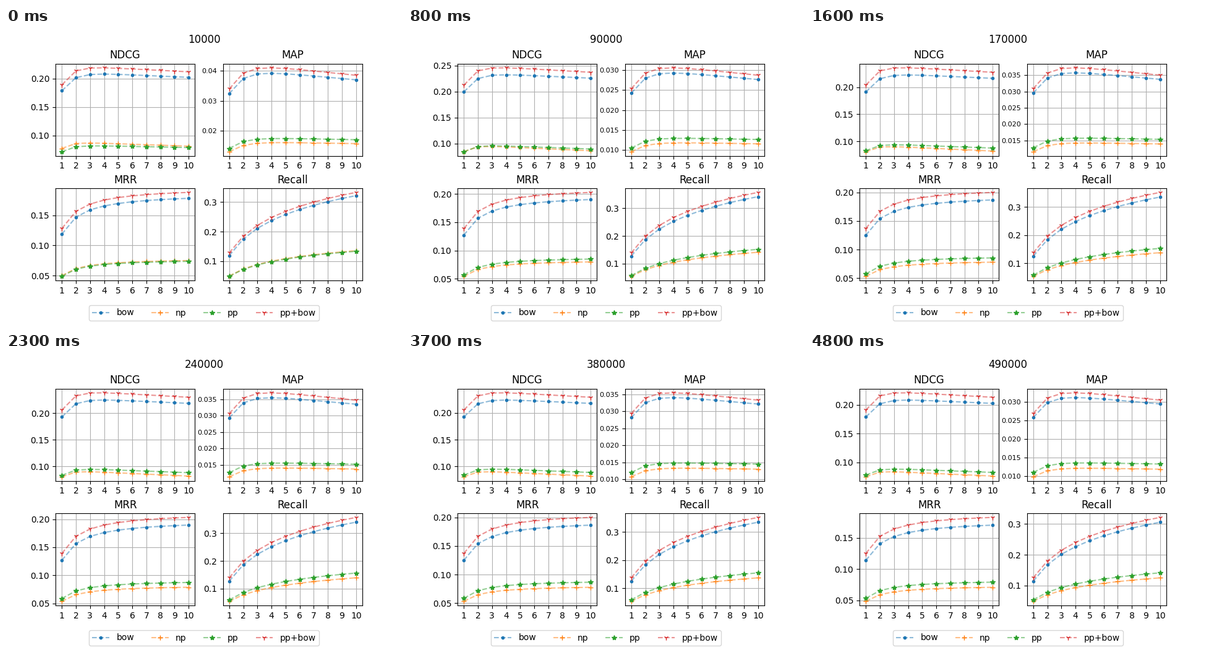
Animation, 640 px wide and 480 px high, one loop 6.3 s. Source, as a matplotlib script:

```python
import numpy as np
import matplotlib.pyplot as plt
from matplotlib.animation import FuncAnimation

STEPS, HOLD = 49, 14
NAMES = ["bow", "np", "pp", "pp+bow"]
MARKERS = [".", "+", "*", "1"]
RANKS = np.arange(1, 11)

# Turning points of the run and the level of pp+bow at each
TURNS = [0, 8, 16, 23, 32, 37, 48]
NDCG_TREND = [.2187, .2454, .2361, .2380, .2385, .2377, .2207]
MAP_TREND = [.0410, .03055, .0373, .0370, .0366, .0354, .0324]
HIT_TREND = [.3330, .3570, .3523, .3577, .3572, .3525, .3218]


def trend(levels, step):
    return np.interp(step, TURNS, levels)


def drift(start, end, step, pace=8):
    """Ease exponentially, one value per series."""
    start, end = np.array(start), np.array(end)
    return end + (start - end) * np.exp(-step / pace)


def peaked(level, dip, keep, slope):
    """Rise from a dip at rank 1, then decline; level is met at rank 4."""
    level, dip, keep, slope = (np.reshape(v, (-1, 1))
                               for v in (level, dip, keep, slope))
    shape = 1 - dip * keep ** (RANKS - 1) - slope * (RANKS - 1)
    return level * shape / shape[:, 3:4]


def ndcg(step):
    share = drift([.950, .395, .374, 1], [.943, .374, .397, 1], step)
    slope = drift([.0051, .0095, .0060, .0056],
                  [.0051, .0130, .0101, .0061], step, 3)
    return peaked(trend(NDCG_TREND, step) * share,
                  [.157, .130, .141, .153], [.28, .18, .22, .25], slope)


def mean_precision(step):
    share = drift([.956, .392, .425, 1], [.962, .370, .416, 1], step, 24)
    return peaked(trend(MAP_TREND, step) * share,
                  .206, .35, [.0104, .0047, .0049, .0111])


def hit_rates(step):
    """Chance that the hit is at each rank: a power law after the first."""
    share = drift([.967, .407, .401, 1], [.951, .388, .439, 1], step)
    ten = trend(HIT_TREND, step) * share
    first = ten * drift([.369, .368, .366, .385],
                        [.373, .389, .378, .389], step, 4)
    tail = RANKS[1:] ** -1.1
    return np.column_stack([first, np.outer(ten - first, tail / tail.sum())])


def reciprocal_rank(step):
    return np.cumsum(hit_rates(step) / RANKS, axis=1)


def recall(step):
    return np.cumsum(hit_rates(step), axis=1)


METRICS = {"NDCG": ndcg, "MAP": mean_precision,
           "MRR": reciprocal_rank, "Recall": recall}

fig, grid = plt.subplots(2, 2, figsize=(6.4, 4.8), dpi=100)
fig.subplots_adjust(left=.125, right=.9, bottom=.15, top=.88,
                    wspace=.2, hspace=.35)
heading = fig.suptitle("", fontsize=12)

panels = []
for ax, (title, metric) in zip(grid.flat, METRICS.items()):
    ax.set_title(title)
    ax.set_xticks(RANKS)
    ax.grid(True)
    lines = []
    for s, (name, marker) in enumerate(zip(NAMES, MARKERS)):
        color = f"C{s}"
        lines += ax.plot(RANKS, metric(0)[s], "--", color=(color, .5),
                         marker=marker, markerfacecolor=color,
                         markeredgecolor=color, label=name)
    panels.append((ax, metric, lines))
grid[0, 1].tick_params(axis="y", labelsize=8)
fig.legend(handles=lines, loc="lower center", ncol=4)


def update(frame):
    step = min(frame, STEPS - 1)
    heading.set_text(str(10000 * (step + 1)))
    for ax, metric, lines in panels:
        for line, values in zip(lines, metric(step)):
            line.set_ydata(values)
        ax.relim()
        ax.autoscale_view()
    return []


anim = FuncAnimation(fig, update, frames=STEPS + HOLD, interval=100,
                     init_func=lambda: update(0), repeat=True, repeat_delay=0)
plt.show()
```
